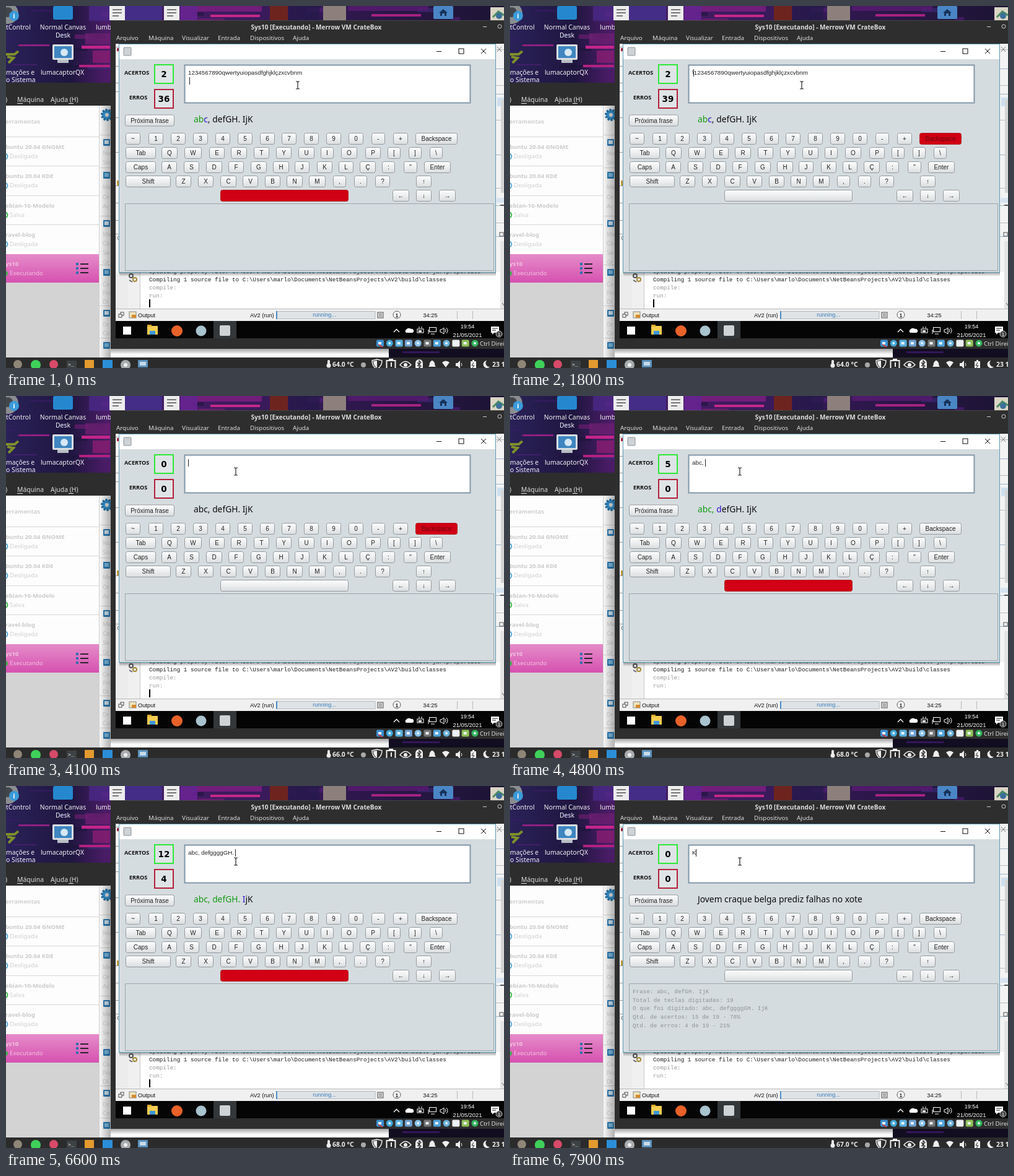
Animation, 804 px wide and 585 px high, one loop 8000 ms. Source, as an HTML page:

```html
<!DOCTYPE html>
<html lang="pt">
<head>
<meta charset="utf-8">
<title>Typing trainer</title>
<style>
html, body { margin: 0; width: 100%; height: 100%; overflow: hidden; background: #17122a; }
svg { display: block; width: 804px; height: 585px; }
text { white-space: pre; }
.ui { font-family: "Noto Sans", sans-serif; }
.ar { font-family: "Liberation Sans", Arial, sans-serif; }
.mo { font-family: "Liberation Mono", monospace; }
.dj { font-family: "DejaVu Sans", sans-serif; }
.b { font-weight: 700; }
.m { text-anchor: middle; }
</style>
</head>
<body>
<svg id="stage" viewBox="0 0 804 585" xmlns="http://www.w3.org/2000/svg"></svg>
<script>
const stage = document.getElementById('stage');
const pen = document.createElement('canvas').getContext('2d');
const width = (s, size) => {
  pen.font = size + 'px "Liberation Sans", Arial, sans-serif';
  return pen.measureText(s).width;
};
const esc = s => s.replace(/&/g, '&amp;').replace(/</g, '&lt;');
const R = (x, y, w, h, fill, more = '') =>
  `<rect x="${x}" y="${y}" width="${w}" height="${h}" fill="${fill}" ${more}/>`;
const C = (x, y, r, fill, more = '') => `<circle cx="${x}" cy="${y}" r="${r}" fill="${fill}" ${more}/>`;
const P = (d, stroke, w = 1, fill = 'none') =>
  `<path d="${d}" stroke="${stroke}" stroke-width="${w}" fill="${fill}"/>`;
const T = (x, y, s, size, fill, cls = 'ui', more = '') =>
  `<text x="${x}" y="${y}" font-size="${size}" fill="${fill}" class="${cls}" ${more}>${esc(s)}</text>`;

let seed = 11;
const rnd = () => (seed = seed * 16807 % 2147483647) / 2147483647;

function wallpaper() {
  const tones = ['#3a1c66', '#57207c', '#2a2a6c', '#7a1f78', '#1a1438', '#3b2f7c'];
  let s = R(0, 0, 804, 585, '#17122a') + R(0, 0, 804, 124, 'url(#wall)');
  for (let i = 0; i < 60; i++) {
    s += R((rnd() * 790).toFixed(0), (rnd() * 120).toFixed(0), (8 + rnd() * 40).toFixed(0),
      (2 + rnd() * 6).toFixed(0), tones[i % 6], 'opacity=".55"');
  }
  return s + R(134, 0, 34, 24, '#4a2c8e', 'opacity=".7"') + R(128, 44, 40, 18, '#6d1f72', 'opacity=".8"')
    + R(122, 64, 46, 5, '#c2258a') + R(140, 72, 28, 20, '#8a1d72', 'opacity=".8"') + R(118, 95, 50, 4, '#b3217f')
    + R(20, 62, 50, 3, '#8e2080') + R(192, 0, 60, 23, '#43318c', 'opacity=".85"')
    + R(281, 0, 28, 23, '#6a2596', 'opacity=".85"') + R(309, 0, 104, 9, '#7c1f80', 'opacity=".85"')
    + R(330, 14, 80, 4, '#c42888') + R(456, 0, 50, 23, '#26194c', 'opacity=".8"')
    + R(552, 0, 130, 8, '#561b70', 'opacity=".85"') + R(590, 13, 80, 4, '#a52282');
}

const sheet = x => R(x, 0, 25, 23, '#ececec') + [5, 10, 15].map((y, i) => R(x + 5, y, i > 1 ? 10 : 15, 2, '#777')).join('');

function desktop() {
  const name = (x, y, s) => T(x, y, s, 10.4, '#f2f2f2', 'ui m');
  return sheet(167) + sheet(255)
    + R(426, 0, 29, 23, '#6e241e') + R(512, 0, 37, 23, '#8d807c')
    + R(690, 0, 32, 21, '#4a86c5', 'rx="2"') + P('M699 11l7-6 7 6h-2v5h-3v-4h-4v4h-3v-5z', 'none', 0, '#17325a')
    + R(782, 2, 22, 22, '#d9d4c4') + P('M786 18l9-9 9 6', '#4a8a66', 3) + C(796, 16, 5, '#3b6f9a')
    + C(3, 12, 17, '#8a8d90') + C(3, 10, 8, '#42454a') + C(13, 16, 8, '#3b9ad9') + T(13, 20, 'i', 11, '#fff', 'ui b m')
    + R(76, 0, 32, 22, '#2588cf', 'rx="3"')
    + T(0, 38, 'tControl', 10.4, '#f2f2f2') + name(92, 38, 'Normal Canvas') + name(92, 51, 'Desk')
    + T(145, 38, 'lumbe', 10.4, '#f2f2f2')
    + P('M0 78h14l6-5M2 82l10 2-8 8', '#7d8f2a', 4)
    + R(75, 62, 34, 25, '#d8dde2', 'rx="2"') + R(78, 65, 28, 19, '#3f86c0') + R(83, 87, 18, 5, '#b8bec4')
    + C(94, 75, 6, '#d6e8f4')
    + T(0, 111, 'mações e', 10.4, '#f2f2f2') + T(0, 123, 'o Sistema', 10.4, '#f2f2f2')
    + name(91, 111, 'lumacaptorQX');
}

function manager() {
  let s = R(0, 124, 150, 444, '#d3d3d3') + R(150, 161, 468, 407, '#fcfcfc') + R(0, 124, 169, 37, '#2d2d2d')
    + T(-1, 155, ')', 10.4, '#ddd') + T(18, 155, 'Máquina', 10.4, '#ddd') + T(72, 155, 'Ajuda (H)', 10.4, '#ddd')
    + R(18, 157, 9, 1, '#ddd') + R(101, 157, 8, 1, '#ddd')
    + R(0, 161, 150, 240, '#fdfdfd') + T(-1, 190, 'erramentas', 9.6, '#cfcfcf', 'ui b');
  const rows = [['buntu 20.04 GNOME', 'Desligada'], ['buntu 20.04 KDE', 'Desligada'],
    ['ebian-10-Modelo', 'Salva'], ['ravel-blog', 'Desligada']];
  rows.forEach(([a, b], i) => {
    const y = 231 + i * 47.3;
    s += R(0, Math.round(y - 20), 150, 1, '#d8d8d8') + T(-1, y, a, 9.6, '#cbcbcb', 'ui b')
      + C(-2, y + 12, 4.5, 'none', `stroke="${i == 2 ? '#3cba46' : '#55a9d8'}" stroke-width="2"`)
      + T(6, y + 15, b, 9.8, '#cfcfcf');
  });
  s += R(0, 401, 150, 46, 'url(#pink)') + T(-1, 420, 'ys10', 9.6, '#f2c3e2', 'ui b')
    + T(6, 435, 'Executando', 9.8, '#f2c3e2') + C(-1, 432, 4, '#46b04c');
  for (let i = 0; i < 3; i++) s += R(113, 415 + i * 7, 4, 4, '#2f6fb0') + R(120, 416 + i * 7, 13, 2, '#2c2430');
  s += R(150, 161, 1, 407, '#cfcfcf');
  s += C(163, 176, 8, '#3b9bd8', 'stroke="#2372a8" stroke-width="4" stroke-dasharray="3 2"') + C(163, 176, 3, '#eee');
  [221, 274, 352, 431, 497, 549].forEach((y, i) => {
    s += R(151, y - 13, 18, 1, '#d8d8d8') + R(157, y - 6, 11, 11, '#2f7fb9', 'rx="1"')
      + R(159, y - 4, 7, 6, i % 2 ? '#7fc0e8' : '#d7ecf8');
  });
  [[241, 'No'], [256, 'Sis'], [296, 'Me'], [312, 'Or'], [327, 'Ac'], [372, 'Me'], [387, 'Co'], [402, 'Se'],
    [417, 'Gr'], [453, 'Co'], [467, 'Pri'], [481, 'Di'], [518, 'Dr'], [532, 'Co']]
    .forEach(([y, w]) => s += T(156, y, w, 9.6, '#d4d4d4'));
  return s + R(150, 161, 19, 407, 'url(#side)') + R(169, 554, 449, 9, 'url(#under)');
}

function machine() {
  const user = 'C:\\Users\\marlo\\Documents\\NetBeansProjects\\AV2\\build\\';
  let s = R(169, 23, 635, 531, '#2e2e2e') + R(169, 23, 635, 1, '#454545')
    + T(501, 38, 'Sys10 [Executando] - Merrow VM CrateBox', 10.1, '#dcdcdc', 'ui b m')
    + R(770, 33, 6, 1, '#ccc') + C(797, 33, 3, 'none', 'stroke="#ccc"');
  [[178, 'Arquivo'], [230, 'Máquina'], [284, 'Visualizar'], [342, 'Entrada'], [394, 'Dispositivos'], [463, 'Ajuda']]
    .forEach(([x, w]) => s += T(x, 55, w, 9.8, '#dedede'));
  // IDE behind the trainer window
  s += R(177, 61, 627, 448, '#ececec') + R(177, 61, 6, 370, '#f4f4f4') + R(790, 61, 14, 370, '#f3f3f3');
  [66, 97, 124, 138, 180, 236, 290, 318, 346, 368].forEach((y, i) => {
    s += R(177, y, 6, 1, '#9aa0a6') + R(791, y + 4, 13, 1, i % 2 ? '#9fb4c6' : '#bbb');
  });
  s += R(179, 68, 3, 5, '#b02a3a') + R(179, 282, 3, 8, '#c29a3a') + C(183, 375, 3, 'none', 'stroke="#777"')
    + P('M793 66l7 8m0-8l-7 8', '#777') + R(793, 148, 11, 14, '#cfe0ee') + R(799, 152, 5, 150, '#d4d4d4')
    + R(792, 310, 12, 8, '#d7e4f0') + R(798, 321, 6, 2, '#555') + R(797, 366, 6, 6, 'none', 'stroke="#555"')
    + R(197, 430, 607, 59, '#fff') + R(197, 430, 19, 59, '#f0f0f0') + R(216, 430, 1, 59, '#c8c8c8')
    + R(798, 380, 6, 109, '#e4e4e4') + P('M801 480l3 4 3-4', '#555')
    + C(202, 436, 3, 'none', 'stroke="#555" stroke-width="2"') + C(208, 442, 3, 'none', 'stroke="#a48a36" stroke-width="2"')
    + P('M199 443l5 3', '#666', 2)
    + T(231, 432, 'Updating property file: ' + user + 'built-jar.properties', 9.3, '#222', 'mo')
    + T(231, 445, 'Compiling 1 source file to ' + user + 'classes', 9.3, '#1c1c1c', 'mo')
    + T(231, 458, 'compile:', 9.3, '#999', 'mo') + T(231, 471, 'run:', 9.3, '#999', 'mo')
    + R(231, 474, 2, 13, '#000', 'id="ide"');
  // IDE status bar
  s += R(177, 489, 627, 20, '#f0f0f0') + R(177, 489, 627, 1, '#b9b9b9')
    + R(185, 495, 5, 5, '#fff', 'stroke="#444"') + R(182, 498, 5, 5, '#fff', 'stroke="#444"')
    + R(199, 494, 11, 10, '#efe3bd', 'stroke="#888"') + R(203, 499, 7, 5, '#d58a2d')
    + T(213, 503, 'Output', 9.4, '#111', 'ar') + T(394, 503, 'AV2 (run)', 9.2, '#111', 'ar')
    + R(437, 493.5, 159, 12, '#dfe3e6', 'stroke="#b4babf"') + R(436, 493, 2, 13, '#4d8ec6')
    + T(514, 502, 'running...', 9, '#3b7fbd', 'ar m')
    + R(600, 495, 9, 9, '#ddd', 'stroke="#555"') + P('M602 498h5m-5 3h5', '#555')
    + C(631, 499, 6, '#fff', 'stroke="#555"') + T(631, 503, '1', 9, '#222', 'ar b m')
    + T(685, 503, '34:25', 9.3, '#111', 'ar m') + R(728, 493, 1, 13, '#bbb') + R(753, 493, 1, 13, '#bbb');
  // guest taskbar
  s += R(177, 509, 627, 28, '#050506') + R(335, 509, 37, 28, '#34373a') + R(189, 518, 13, 13, '#fff')
    + R(228, 517, 17, 14, '#f5ce52') + R(228, 515, 7, 3, '#e0ac2c') + R(232, 525, 9, 6, '#3d96d8')
    + C(276, 525, 9, '#e8622a') + C(315, 525, 8.5, '#a9c3cf') + R(345, 516, 17, 17, '#cfd3d6', 'rx="2"')
    + P('M626 527l4.5-4.5 4.5 4.5', '#fff', 1.3)
    + P('M646 528a3 3 0 0 1 0-5a5 4 0 0 1 8-1a3 3 0 0 1 2 6z', 'none', 0, '#fff')
    + R(664, 522, 10, 6, 'none', 'stroke="#fff"') + R(666, 524, 5, 3, '#fff') + P('M667 518v3m4-3v3', '#fff')
    + R(683.5, 519.5, 11, 7, 'none', 'stroke="#fff"') + P('M686 530h6m-10-7v7', '#fff')
    + P('M701 523h2l4-3v10l-4-3h-2z', '#fff') + P('M709 522q2 3 0 5m2-7q4 5 0 9', '#fff')
    + T(745, 521, '19:54', 9, '#fff', 'ar m') + T(745, 535, '21/05/2021', 9.4, '#fff', 'ar m')
    + P('M783 518h13v10h-8l-3 3v-3h-2z', 'none', 0, '#fff') + P('M785 521h9m-9 3h6', '#222')
    + C(796, 530, 5, '#444', 'stroke="#fff" stroke-width=".7"') + T(796, 533, '1', 8, '#fff', 'ar m');
  const tones = ['#3c8fd0', '#42a8d8', '#5ab0dd', '#6f9fd0', '#86c0e8', '#777', '#4fa4dc', '#69b1d9', '#eee', '#8fc057', '#35b55e'];
  tones.forEach((c, i) => {
    const x = 598 + i * 15.3;
    s += i % 3 == 1 ? C(x + 6, 545, 5.5, c) + C(x + 6, 545, 2, '#e8f4fb')
      : R(x, 539.5, 12, 11, c, 'rx="2"') + R(x + 3, 543, 5, 4, '#e8f4fb');
  });
  return s + P('M601 547l7 4', '#d23a3a', 2) + T(765, 549, 'Ctrl Direita', 9.6, '#dedede');
}

function taskbar() {
  let s = R(618, 554, 186, 14, '#120d20') + R(640, 558, 60, 3, '#34165a') + R(0, 568, 804, 17, '#2b2b2b');
  s += C(19, 579, 7, '#8f8677') + C(48, 580, 8, '#3fd05a') + C(77, 579, 7, '#d84a6a')
    + R(98, 573, 16, 12, '#3c4144') + T(100, 582, '>_', 8, '#fff', 'mo')
    + R(127, 572, 15, 13, '#e49a2e') + R(156, 572, 16, 13, '#2b8fd8') + C(193, 580, 8, '#a8acaf') + C(193, 580, 3, '#eee')
    + R(213, 572, 16, 12, '#5c92bd') + R(216, 575, 10, 6, '#c6dae8');
  s += R(519, 572, 4, 9, '#eee', 'rx="2"') + C(521, 581, 3.5, '#eee') + C(577, 580, 4, '#a9a9a9')
    + P('M591 573l8-2 8 2q0 9-8 14q-8-5-8-14z', '#eee', 1.5) + P('M599 573v12q-6-4-6-11z', 'none', 0, '#eee')
    + R(614.5, 573, 14, 14, 'none', 'stroke="#eee" stroke-width="2"') + R(618, 570, 7, 4, '#eee') + R(621, 576, 2, 7, '#eee')
    + P('M636 580q9-11 18 0q-9 9-18 0z', '#eee', 1.5) + C(645, 580, 3, '#eee')
    + R(661, 571, 12, 18, '#eee', 'rx="6"') + P('M664 576l6 6-3 3v-12l3 3-6 6', '#2b2b2b', 1.2)
    + P('M682 583q2-2 2-6q4-8 8 0q0 4 2 6z', 'none', 0, '#eee')
    + P('M704 576q6-5 12 0l-6 8z', 'none', 0, '#eee')
    + P('M726 577h3l4-4v13l-4-4h-3z', 'none', 0, '#eee') + P('M735 577q2 3 0 5', '#eee')
    + R(750, 574, 9, 12, '#eee', 'rx="1"') + R(753, 572, 3, 2, '#eee') + P('M755 576l-3 5h4l-3 4', '#2b2b2b')
    + P('M776 573a6 6 0 1 0 5 10a6 6 0 0 1-5-10z', 'none', 0, '#eee');
  return s + T(785, 583, '23 1', 10.4, '#eee', 'ui b') + T(527, 583, '', 10.4, '#eee', 'ui b', 'id="temp"');
}

const keyMap = {};
const key = (label, x, y, w, name = label) => {
  const id = 'k' + Object.keys(keyMap).length;
  keyMap[name] = id;
  return R(x + .5, y - 8.5, w - 1, 18, 'url(#key)', `rx="3" stroke="#949a9f" id="${id}"`)
    + T(x + w / 2, y + 4, label, 10, '#222', 'ar m', `id="${id}t"`);
};

function keyboard() {
  const row = (labels, centres, y) => [...labels].map((c, i) => {
    const w = Math.round(width(c, 10) + 18.5);
    return key(c, Math.round(centres[i] - w / 2), y, w);
  }).join('');
  return key('~', 193, 214, 24)
    + row('1234567890-+', Array.from({ length: 12 }, (_, i) => 242 + i * 35.9), 214)
    + key('Backspace', 661, 214, 68) + key('Tab', 193, 237, 49)
    + row('QWERTYUIOP[]\\', [264, 302, 340, 376, 412, 448, 485, 518, 554, 592, 626, 660, 694], 237)
    + key('Caps', 193, 260, 49)
    + row('ASDFGHJKLÇ:"', [263, 299, 336, 371, 408, 444, 478, 514, 549, 584, 617, 653], 260)
    + key('Enter', 675, 260, 43) + key('Shift', 193, 283, 73)
    + row('ZXCVBNM,.?', [286, 322, 359, 394, 430, 466, 502, 538, 572, 608], 283)
    + key('↑', 662, 283, 25) + key('', 346, 306, 207, ' ')
    + key('←', 624, 306, 27) + key('↓', 662, 306, 25) + key('→', 699, 306, 27);
}

const report = ['Frase: abc, defGH. IjK', 'Total de teclas digitadas: 19', 'O que foi digitado: abc, defggggGH. IjK',
  'Qtd. de acertos: 15 de 19 - 78%', 'Qtd. de erros: 4 de 19 - 21%'];

function trainer() {
  const box = (y, c, id) => R(240, y, 30, 30, '#dfe4e6', `stroke="${c}" stroke-width="2"`)
    + R(240, y, 30, 30, 'none', 'stroke="#fff" stroke-width="2" stroke-dasharray="1 2" opacity=".2"')
    + T(255, y + 20, '', 13.5, '#000', 'dj b m', `id="${id}"`);
  return R(183, 431, 608, 6, 'url(#under)')
    + R(182.5, 61.5, 608, 369, '#d5dcdf', 'stroke="#5b9bb5"') + R(183, 62, 607, 24, '#fff')
    + R(190, 67, 12, 13, '#cdd2d6', 'stroke="#8b9297" rx="1"')
    + R(695, 73, 8, 1, '#111') + R(731, 69, 8, 8, 'none', 'stroke="#111"') + P('M767 69l8 8m0-8l-8 8', '#111')
    + T(191, 111, 'ACERTOS', 9.1, '#111', 'ui b') + T(199, 151, 'ERROS', 9.1, '#111', 'ui b')
    + box(95, '#1ee82a', 'hits') + box(135, '#b0102c', 'errs')
    + R(288.5, 95.5, 461, 61, '#fff', 'stroke="#8298a8" stroke-width="2"')
    + T(294, 111, '', 9.8, '#222', 'ar', 'id="typed"') + R(294, 102, 1, 12, '#222', 'id="caret"')
    + R(192.5, 176, 79, 18, 'url(#key)', 'rx="3" stroke="#949a9f"') + T(232, 189, 'Próxima frase', 10, '#222', 'ar m')
    + `<text x="303" y="188" font-size="13.8" class="ui"><tspan id="done" fill="#129a12"/><tspan id="next" fill="#2c14c8"/><tspan id="rest" fill="#0b0b0b"/></text>`
    + keyboard()
    + R(192.5, 319.5, 595, 108, '#d5dcdf', 'stroke="#9ca5aa"')
    + '<g id="report">' + report.map((l, i) => T(198, 335 + i * 13.7, l, 9.35, '#8d9397', 'mo')).join('') + '</g>'
    + `<g id="mouse">${P('M-3-6h2l1 1 1-1h2M0-5v10M-3 6h2l1-1 1 1h2', '#222', 1.2)}</g>`;
}

const fade = (id, dir, a, b) => `<linearGradient id="${id}" ${dir}><stop stop-opacity="${a}"/><stop offset="1" stop-opacity="${b}"/></linearGradient>`;
stage.innerHTML = `<defs>
<linearGradient id="key" x2="0" y2="1"><stop stop-color="#fdfdfd"/><stop offset=".5" stop-color="#eceeef"/><stop offset="1" stop-color="#dadddf"/></linearGradient>
<linearGradient id="pink" x2="0" y2="1"><stop stop-color="#e58cc9"/><stop offset="1" stop-color="#d651b0"/></linearGradient>
<linearGradient id="wall"><stop stop-color="#2a2158"/><stop offset=".13" stop-color="#1f1640"/><stop offset=".2" stop-color="#4a1c66"/><stop offset=".5" stop-color="#3a1a5c"/><stop offset="1" stop-color="#1c1434"/></linearGradient>
${fade('side', '', 0, .3)}${fade('under', 'x2="0" y2="1"', .35, 0)}
</defs>` + wallpaper() + desktop() + manager() + machine() + trainer() + taskbar();

// time, pressed key, typed text, hits, errors, caret index (LINE2 = second line, OFF = hidden)
const LINE2 = -2, OFF = -1;
const base = '1234567890qwertyuiopasdfghjklçzxcvbnm', go = 'abc, defggggGH. IjK';
const steps = [
  [0, ' ', base, 2, 36, LINE2], [800, '', base, 2, 36, LINE2], [1000, '↑', base, 2, 36, 0],
  [1200, '\\', '\\' + base, 2, 37, 1], [1400, '\\', '\\\\' + base, 2, 38, 2],
  [1500, '\\', '\\\\\\' + base, 2, 39, 3], [1600, 'Backspace', '\\\\' + base, 2, 39, 2],
  [1700, 'Backspace', '\\' + base, 2, 39, 1], [1900, 'Backspace', base, 2, 39, 0],
  [2400, 'Backspace', '', 0, 0, 0],
  ...[[4200, 'A', 1], [4300, '', 1], [4400, 'B', 2], [4500, 'C', 3], [4600, ',', 4], [4700, '', 4], [4800, ' ', 5],
    [4900, 'D', 6], [5000, 'E', 7], [5100, 'F', 8], [5400, 'G', 10], [5500, 'G', 12], [5700, 'Shift', 13],
    [5900, 'H', 14], [6200, '.', 15], [6600, ' ', 16], [6700, 'Shift', 16], [6800, 'I', 17], [7000, 'J', 18],
    [7200, 'Shift', 18]].map(([t, k, n]) => {
    const errs = Math.max(0, Math.min(4, n - 8));
    return [t, k, go.slice(0, n), n - errs, errs, t >= 5500 && t < 5900 ? OFF : n];
  }),
  [7400, 'K', 'K', 0, 0, 1], [7600, 'Shift', 'K', 0, 0, 1], [7700, '', 'K', 0, 0, 1]
];
const temps = [[0, 64], [4100, 66], [4800, 68], [5700, 66], [6600, 68], [7700, 67]];
const at = (list, t) => list.filter(e => e[0] <= t).pop();
const el = id => document.getElementById(id);
const put = (id, s) => el(id).textContent = s;
const paint = (name, down) => {
  if (!(name in keyMap)) return;
  el(keyMap[name]).setAttribute('fill', down ? '#d10014' : 'url(#key)');
  el(keyMap[name]).setAttribute('stroke', down ? '#b01522' : '#949a9f');
  el(keyMap[name] + 't').setAttribute('fill', down ? '#6a0610' : '#222');
};
let last = -1, held = '';

function draw(t) {
  const [, k, text, hits, errs, pos] = at(steps, t);
  paint(held, false);
  paint(held = k, true);
  put('typed', text);
  put('hits', hits);
  put('errs', errs);
  const phrase = t < 7400 ? 'abc, defGH. IjK' : 'Jovem craque belga prediz falhas no xote';
  put('done', phrase.slice(0, hits));
  put('next', hits ? phrase[hits] : '');
  put('rest', phrase.slice(hits ? hits + 1 : 0));
  const caret = el('caret');
  caret.setAttribute('visibility', pos == OFF ? 'hidden' : 'visible');
  caret.setAttribute('x', pos == LINE2 ? 296 : Math.round(293.7 + width(text.slice(0, Math.max(0, pos)), 9.8)));
  caret.setAttribute('y', pos == LINE2 ? 115 : 102);
  el('report').setAttribute('visibility', t < 7400 ? 'hidden' : 'visible');
  el('ide').setAttribute('visibility', (t >= 4800 && t < 5100) || t >= 7700 ? 'hidden' : 'visible');
  put('temp', at(temps, t)[1] + '.0 °C');
  const u = Math.max(0, Math.min(1, (t - 1800) / 600)), e = u * u * (3 - 2 * u);
  el('mouse').setAttribute('transform', `translate(${471 - 100 * e} ${128 - 6 * e})`);
}

function tick() {
  const t = Math.floor(performance.now() % 8000 / 100) * 100;
  if (t != last) draw(last = t);
  requestAnimationFrame(tick);
}
tick();
</script>
</body>
</html>
```
